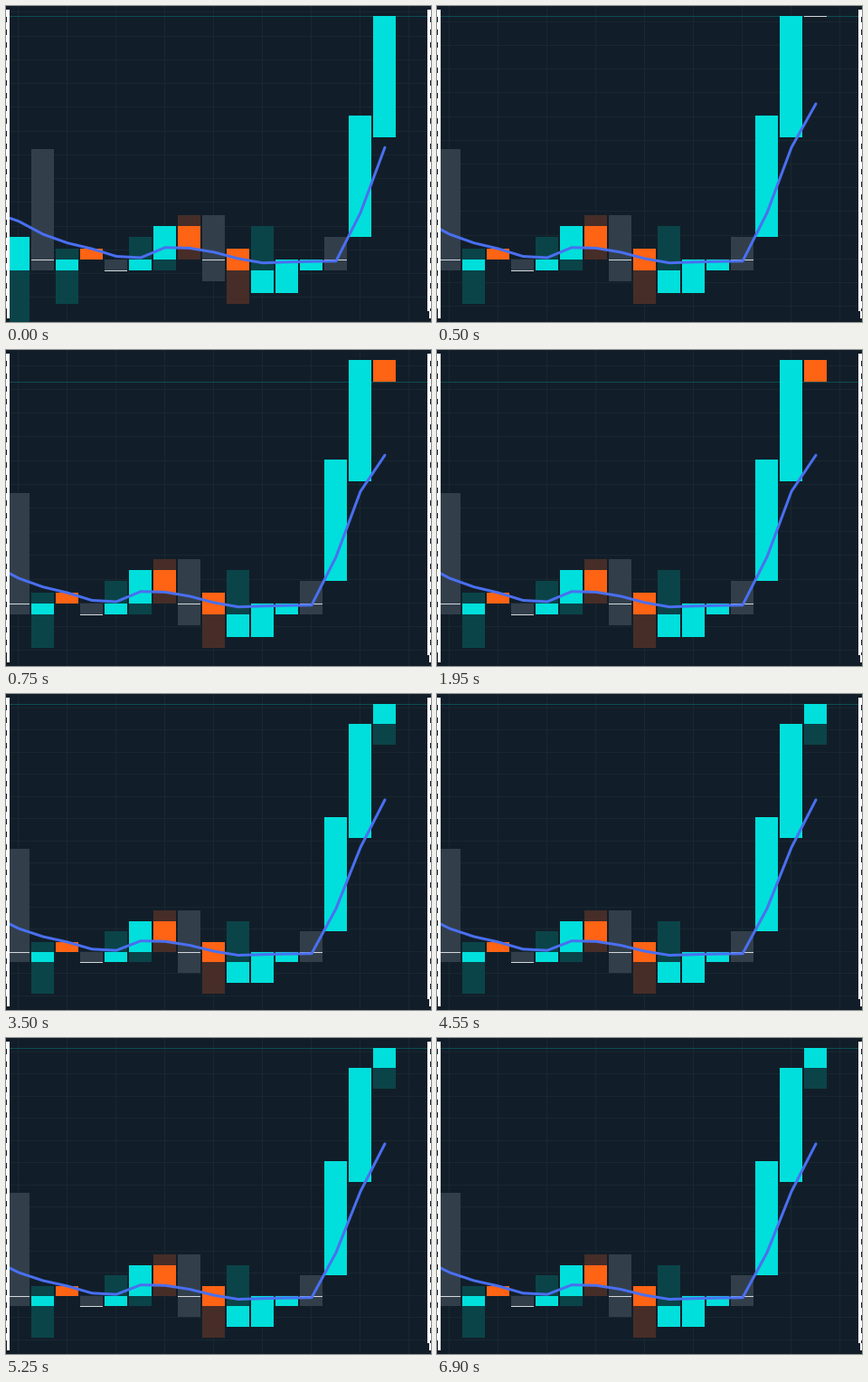
Write a matplotlib script that moves like this. It is 470 by 349 pixels and loops after 8000 ms.

```python
import matplotlib.pyplot as plt
from matplotlib.animation import FuncAnimation
from matplotlib.patches import Rectangle

W, H, DPI = 470, 349, 100
STEP_MS, LOOP_MS = 250, 8000
PITCH, BAR = 27, 25

BG, GRID, PRICE = "#111e29", "#192731", "#0c4d51"
UP, DOWN, FLAT = "#00dfdb", "#ff6314", "#d3d7da"
DIM = {UP: "#0a4449", DOWN: "#472d28", FLAT: "#323f4b"}
BLUE = "#4a6ff0"

# Turning points of the price within each candle, in ticks counted downward.
HISTORY = [
    (23, 30, 20), (22, 12, 23, 22), (23, 21, 26, 22), (21, 22),
    (23, 22, 23), (23, 20, 22), (22, 23, 19), (19, 18, 22, 21),
    (22, 18, 24, 22), (21, 26, 23), (25, 19, 23), (25, 22),
    (23, 22), (22, 20, 23, 22), (20, 9), (11, 0),
]
# Trades of the newest candle: time in ms and price.
TRADES = {500: 0, 750: 2, 2750: 1, 3500: -2}
EMA_SEED, ALPHA = 17.7, 1 / 3

# Vertical fit: the highest price sits at TOP, price FLOOR is SPAN below it.
TOP, SPAN, FLOOR = 10.6, 344.65, 28.15
GRID_TICKS = 2.143

fig = plt.figure(figsize=(W / DPI, H / DPI), dpi=DPI, facecolor=BG)
ax = fig.add_axes([0, 0, 1, 1])


def box(x0, y0, x1, y1, color, z):
    ax.add_patch(Rectangle((x0, y0), x1 - x0, y1 - y0, facecolor=color,
                           linewidth=0, antialiased=False, zorder=z))


def draw_grid(first, gap):
    for x in range(13, W, 2 * PITCH):
        box(x, 0, x + 1, H, GRID, 1)
    y = first % gap
    while y < H:
        box(0, int(y), W, int(y) + 1, GRID, 1)
        y += gap


def draw_candle(x, path, to_row):
    start, close = path[0], path[-1]
    color = UP if close < start else DOWN if close > start else FLAT
    box(x, to_row(min(path)), x + BAR, to_row(max(path)), DIM[color], 3)
    top, bottom = sorted((to_row(start), to_row(close)))
    box(x, top, x + BAR, max(bottom, top + 1), color, 4)


def draw_frame():
    box(0, 0, 4, H, BG, 6)
    box(1, 4, 4, 345, "white", 7)
    box(466, 4, 469, 337, "white", 7)
    box(468, 337, 470, 345, "white", 7)
    for y in range(4, 340, 14):
        box(0, y, 1, y + 8, "white", 7)
        box(469, y, 470, y + 8, "white", 7)


def ema(candles):
    values = [EMA_SEED]
    for path in candles:
        values.append(values[-1] + ALPHA * (path[-1] - values[-1]))
    return values


def draw(frame):
    t = frame * STEP_MS
    live = tuple(price for start, price in TRADES.items() if t >= start)
    candles = HISTORY + ([live] if live else [])
    shift = PITCH if live else 0
    high = min(min(path) for path in candles)
    tick = SPAN / (FLOOR - high)
    zero = TOP - high * tick

    def to_row(n):
        return round(zero + tick * n)

    ax.clear()
    ax.set_xlim(0, W)
    ax.set_ylim(H, 0)
    ax.axis("off")

    phase = 0.53 if live else -0.3
    draw_grid(zero + phase * tick, GRID_TICKS * tick)
    last = to_row(candles[-1][-1])
    box(0, last, W, last + 1, PRICE, 2)

    for i, path in enumerate(candles):
        draw_candle(1 + PITCH * i - shift, path, to_row)

    values = ema(candles)
    xs = [PITCH * i - 13 - shift for i in range(len(values))]
    ys = [zero + tick * v + 1 for v in values]
    ax.plot(xs, ys, color=BLUE, linewidth=3 * 72 / DPI, zorder=5,
            solid_capstyle="round", solid_joinstyle="round")
    draw_frame()
    return []


anim = FuncAnimation(fig, draw, frames=LOOP_MS // STEP_MS, interval=STEP_MS,
                     init_func=lambda: draw(0), repeat=True, repeat_delay=0,
                     blit=False)
plt.show()
```
